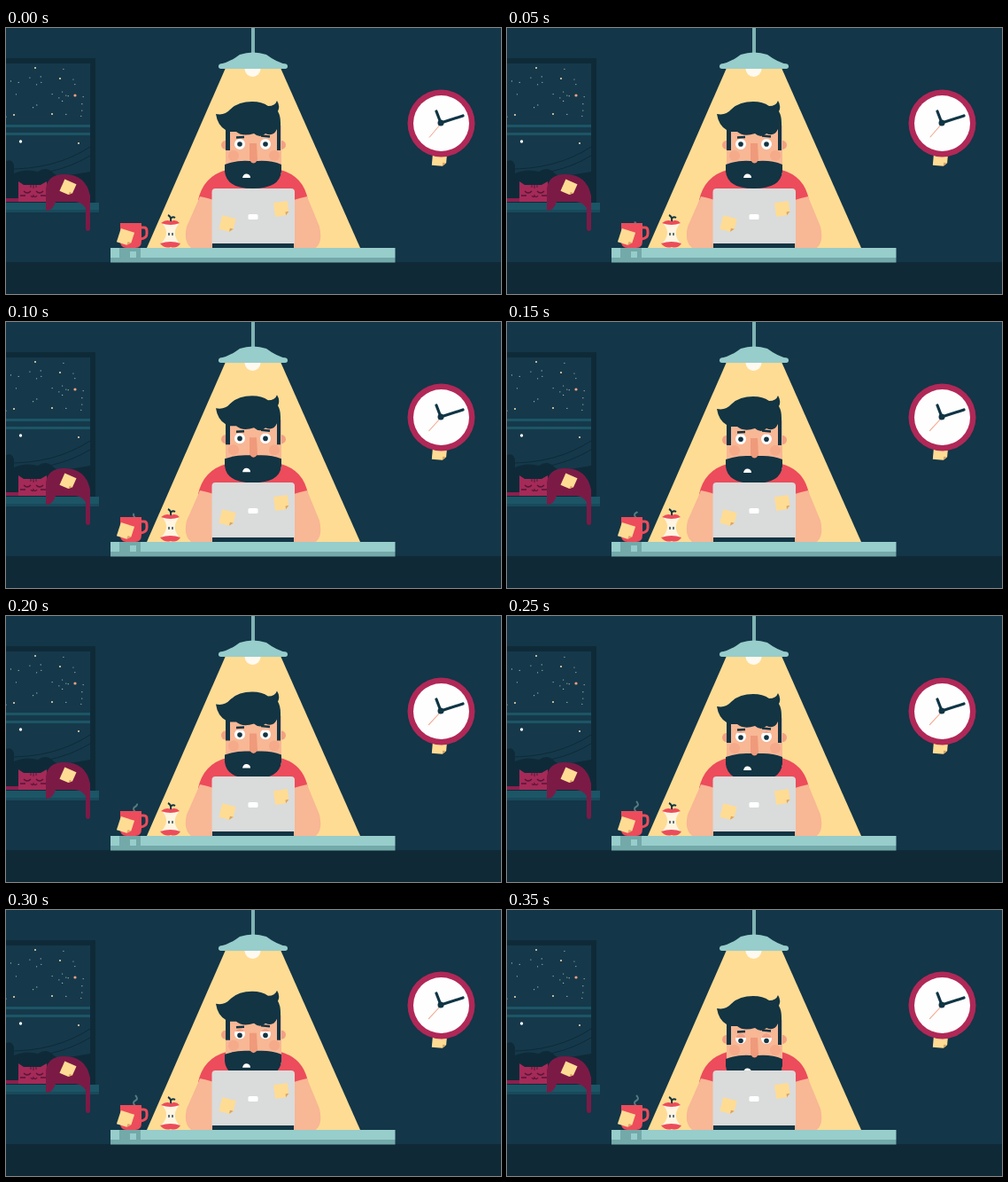
Animation of 559x300 px, one loop 0.4 s. Source, as an HTML page:

```html
<!DOCTYPE html>
<html lang="en">
<head>
<meta charset="utf-8">
<title>Late night work</title>
<style>
  html, body { margin: 0; width: 100%; height: 100%; overflow: hidden; background: #133648; }
  svg { display: block; width: 100vw; height: 100vh; }
</style>
</head>
<body>
<svg viewBox="0 0 559 300">
  <defs>
    <g id="note">
      <path d="M-8-8H8V4L4 8H-8Z" fill="#ffdc94"/>
      <path d="M8 4H4V8Z" fill="#d9a566"/>
    </g>
    <clipPath id="eyes"><circle cx="264" cy="131" r="6"/><circle cx="293" cy="131" r="6"/></clipPath>
  </defs>

  <rect width="559" height="300" fill="#133648"/>
  <rect y="264" width="559" height="36" fill="#0f2937"/>

  <g id="window">
    <path d="M0 34H101V199H0Z" fill="#0e2a38"/>
    <path d="M0 40H95V197H0Z" fill="#15394a"/>
    <g id="stars"></g>
    <path d="M0 109H95V112H0ZM0 118H95V121H0Z" fill="#1c5566"/>
    <path d="M0 159Q55 160 95 134M0 166Q55 168 95 144" fill="none" stroke="#0e2a38"/>
    <path d="M0 197V150Q7 147 9 155V164Q22 158 36 162Q46 155 54 164L60 168L95 162V197Z" fill="#0e2a38"/>
    <rect y="197" width="105" height="11" fill="#1c5566"/>
    <rect y="205" width="105" height="3" fill="#184a5b"/>
  </g>

  <g id="cat">
    <path d="M0 192H16V196H0Z" fill="#8b1f4d"/>
    <path d="M14 196V173L20 177H39L46 173V196Z" fill="#a52a58"/>
    <path d="M45 205V181Q47 165 66 165Q90 165 95 189V226Q95 229 92.500 229Q90 229 90 226V203Q85 196 78 196H56Q53 206 45 206Z" fill="#7c1a46"/>
    <path d="M20 184q4 4 8 0M34 184q4 4 8 0M28 189q2 3 3 0q2 3 4 0M16 189h6M39 189h6" fill="none" stroke="#571638" stroke-width="1.300"/>
    <path d="M28 177v3M31 177v4M34 177v3" stroke="#571638"/>
    <use href="#note" transform="translate(70 180) rotate(24) scale(.9)"/>
  </g>

  <g id="clock">
    <use href="#note" transform="translate(489.500 147.500) rotate(5)"/>
    <circle cx="491.500" cy="107.500" r="38" fill="#b02857"/>
    <circle cx="491.500" cy="107.500" r="31.500" fill="#fefefe"/>
    <path id="second" d="M491 108L478 123.500" stroke="#f3a184"/>
    <path d="M491 107L486 94M491 107L516 99" stroke="#103545" stroke-width="3.200" stroke-linecap="round"/>
    <circle cx="491" cy="107" r="3.500" fill="#103545"/>
  </g>

  <path d="M248 45H310L400 248H159Z" fill="#ffdc94"/>
  <path d="M277 0h4v30h-4Z" fill="#7fb3b3"/>
  <circle cx="278.500" cy="46" r="9" fill="#fffaf0"/>
  <path d="M241 41Q252 39 264 30Q279 25 294 30Q306 39 317 41Z" fill="#97cdcb"/>
  <rect x="240" y="40.500" width="78" height="5.500" rx="2.700" fill="#97cdcb"/>

  <path d="M217 194Q223 167 249 160H310Q336 167 341 194V248H217Z" fill="#ec4c5b"/>
  <path d="M219 190Q229 192 234 194V248H209Q200 241 204 224ZM340 190Q331 192 325 194V248H350Q358 241 354 224Z" fill="#f8b795"/>

  <g id="head">
    <circle cx="248" cy="132" r="5" fill="#f3a184"/>
    <circle cx="311" cy="132" r="5" fill="#f3a184"/>
    <path d="M248 110H311V165H248Z" fill="#f8b795"/>
    <circle cx="257" cy="144" r="6" fill="#f5aa8a"/>
    <circle cx="303" cy="144" r="6" fill="#f5aa8a"/>
    <g clip-path="url(#eyes)">
      <path d="M257 124h44v14h-44Z" fill="#fff"/>
      <g id="pupils" fill="#123443"><circle cx="264" cy="131" r="2.800"/><circle cx="293" cy="131" r="2.800"/></g>
      <rect id="lids" x="257" y="124" width="44" height="1" fill="#f3a184"/>
    </g>
    <path d="M260 123.500L269 123M288 121.500L298 122.500" stroke="#123443" stroke-width="2.500"/>
    <path d="M247 154Q260 149 275 150H284Q299 149 311 154V162Q309 181 279 181Q249 181 247 162Z" fill="#123443"/>
    <path d="M275 130H283L284 149Q279.500 156 275 149Z" fill="#ef9a7b"/>
    <path d="M267 169Q268 164 272 164.500Q276 165 276 169Z" fill="#fff"/>
    <path d="M237 97Q247 99 253 92Q262 83 278 83Q289 83 296 88Q304 88 306 82Q310 88 307 94Q310 99 310 107V138H306V114Q302 123 293 119Q287 125 280 119Q267 123 260 117H253V138H248V115Q239 110 237 97Z" fill="#123443"/>
  </g>

  <path d="M233 242H325V248H233Z" fill="#123443"/>
  <path d="M232.500 243V185Q232.500 181 236.500 181H322Q326 181 326 185V243Z" fill="#dadbdb"/>
  <rect x="273.500" y="210" width="11" height="6" rx="1.500" fill="#fff"/>
  <use href="#note" transform="translate(250 221) rotate(14)"/>
  <use href="#note" transform="translate(311 204) rotate(-8)"/>

  <path d="M118 248H439.500V259H118Z" fill="#97cdcb"/>
  <path d="M118 259H439.500V264.500H118Z" fill="#73a9a9"/>
  <path d="M128 248H152V259H147V252H140V259H128Z" fill="#73a9a9"/>

  <g id="mug">
    <path id="steam" d="M146 221Q142 217 146 215T146 209" pathLength="1" stroke-dasharray="1 2" fill="none" stroke="#557b80" stroke-width="2"/>
    <path d="M152 225H156Q159 225 159 229V232Q159 237 152 238" fill="none" stroke="#ec4c5b" stroke-width="3"/>
    <path d="M129 220H153V240Q153 248 146 248H136Q129 248 129 240Z" fill="#ec4c5b"/>
    <use href="#note" transform="translate(135 236) rotate(18)"/>
  </g>

  <g id="apple">
    <path d="M177 221H195Q186 232 196 243H175Q186 232 177 221Z" fill="#fff5e1"/>
    <path d="M175 220Q181 215 186 218Q192 215 196 220Q186 224 175 220ZM174 243Q186 239 197 243Q193 249 186 247Q179 249 174 243Z" fill="#ec4c5b"/>
    <path d="M186 218Q187 213 183 211M186 215Q188 212 191 214" fill="none" stroke="#123443" stroke-width="2"/>
    <path d="M184 231v3M188 231v3" stroke="#123443" stroke-width="1.300"/>
  </g>
</svg>
<script>
  const LOOP = 400, STEP = 50;
  const get = id => document.getElementById(id);

  let seed = 7;
  const random = () => (seed = seed * 16807 % 2147483647) / 2147483647;

  function addStar(x, y, r, color) {
    const star = document.createElementNS("http://www.w3.org/2000/svg", "circle");
    for (const [key, value] of Object.entries({ cx: x, cy: y, r, fill: color })) star.setAttribute(key, value);
    get("stars").append(star);
  }
  for (let i = 0; i < 24; i++) addStar(random() * 93, 43 + random() * 62, 0.6, "#b4c4c5");
  addStar(78, 76, 1.6, "#f3a184");
  addStar(16.5, 128, 1.7, "#fff");
  for (const [x, y] of [[33, 45], [61, 57], [9, 98], [52, 97], [82, 130]]) addStar(x, y, 1, "#f7dfbb");

  function draw(time) {
    const t = Math.floor(time % LOOP / STEP) * STEP;
    const nod = (t / (LOOP - STEP)) ** 3;
    get("head").setAttribute("transform", `translate(0 ${14 * nod})`);
    get("pupils").setAttribute("transform", `translate(0 ${2.5 * nod})`);
    get("lids").setAttribute("height", 1 + 5 * nod);
    get("steam").setAttribute("stroke-dashoffset", 1 - Math.min(1, t / 250));
    get("second").setAttribute("transform", `rotate(${Math.min(3, t / 50)} 491 107)`);
  }

  function tick() {
    draw(performance.now());
    requestAnimationFrame(tick);
  }
  tick();
</script>
</body>
</html>
```
